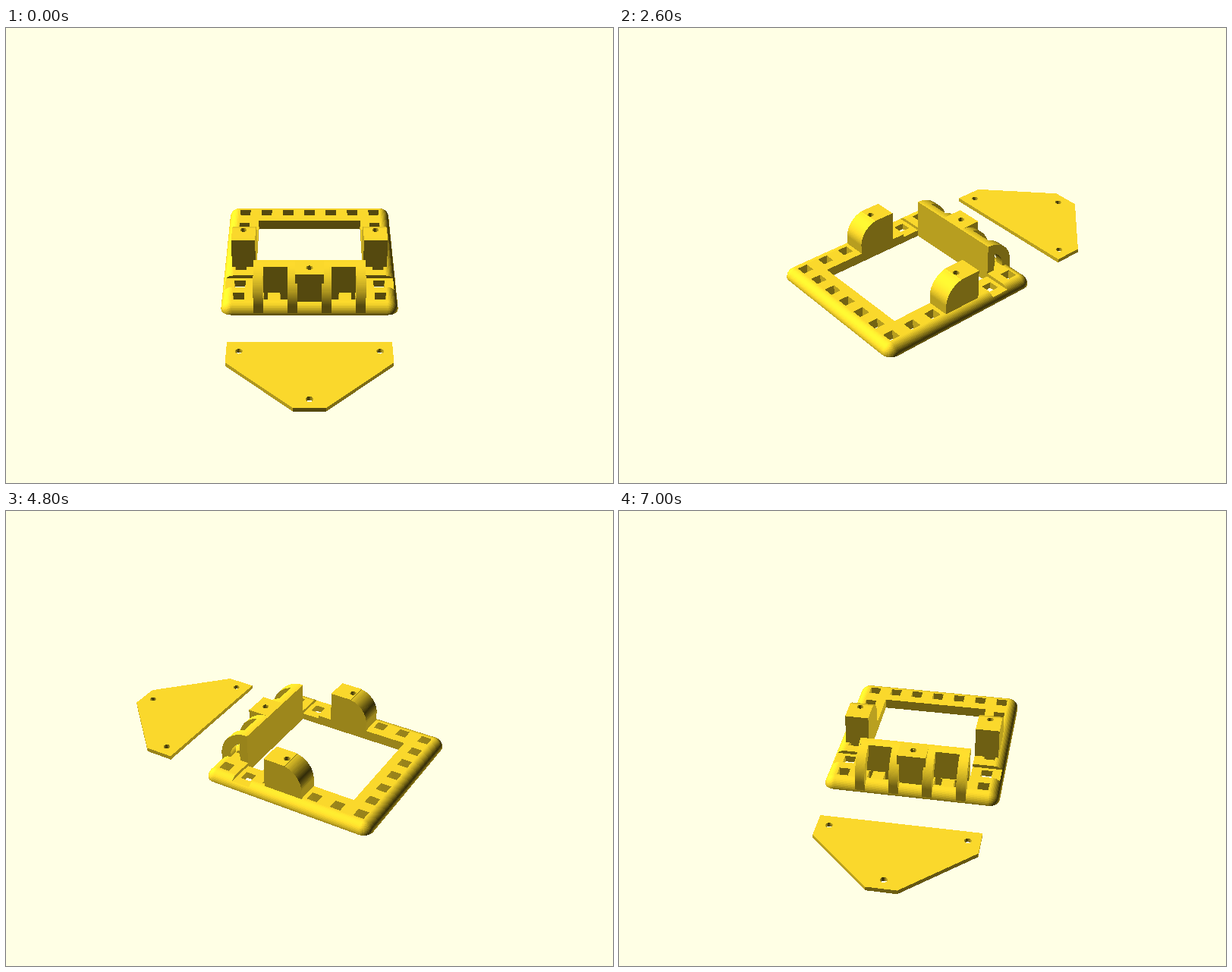
Recreate the animation shown at these times as an HTML page with a canvas. Size 800 by 600 pixels, loop 7.2 s.

```html
<!DOCTYPE html>
<html lang="en">
<head>
<meta charset="utf-8">
<title>Turntable</title>
<style>
  html, body { margin: 0; width: 100%; height: 100%; overflow: hidden; background: #ffffe5; }
  canvas { display: block; }
</style>
</head>
<body>
<canvas id="stage" width="800" height="600"></canvas>
<script>
const W = 800, H = 600, RAD = Math.PI / 180;
const FOCAL = 300 / Math.tan(11.25 * RAD), DIST = 500;
const SIN = Math.sin(55 * RAD), COS = Math.cos(55 * RAD);
const COLOR = [249, 215, 44], PAPER = 0xffe5ffff;
const STEP_MS = 200, STEPS = 36;

// ---- Model: a face is a list of planar loops, filled even-odd ----
const faces = [];
const alongX = (y, z, x) => [x, y, z];
const alongZ = (x, y, z) => [x, y, z];

function prism(loops, lo, hi, place, caps = true) {
  const sides = [];
  for (const loop of loops) {
    loop.forEach(([a, b], i) => {
      const [c, d] = loop[(i + 1) % loop.length];
      sides.push([[place(a, b, lo), place(c, d, lo), place(c, d, hi), place(a, b, hi)]]);
    });
  }
  faces.push(...sides);
  if (caps) for (const w of [lo, hi]) faces.push(loops.map(l => l.map(([a, b]) => place(a, b, w))));
  return sides;
}

function arc(cx, cy, r, from, to, n) {
  return Array.from({ length: n + 1 }, (_, i) => {
    const a = (from + (to - from) * i / n) * RAD;
    return [cx + r * Math.cos(a), cy + r * Math.sin(a)];
  });
}
const circle = (x, y, r) => arc(x, y, r, 0, 345, 23);
const rect = (x0, y0, x1, y1) => [[x0, y0], [x1, y0], [x1, y1], [x0, y1]];

const TOP = -4.6, BASE = -9.1, HIGH = 9.4, NOTCH_Z = -6.1;
const ROUND = TOP - BASE;
const INNER = 23.5, INNER_BACK = 34.7;
const OUTER = 32.9, FRONT = -26.1, BACK = 44.2; // where the rim starts to curve
const NOTCH_FRONT = -17, NOTCH_BACK = -8.6;

function buildFrame() {
  const holes = { front: [], left: [], right: [], back: [] };
  for (let i = 0; i < 7; i++) for (let j = 0; j < 7; j++) {
    if (i % 6 && j % 6) continue;
    const x = i * 10 - 30, y = j * 65 / 6 - 23.5;
    const part = j === 0 ? 'front' : j > 1 ? 'back' : i ? 'right' : 'left';
    holes[part].push(rect(x - 2.4, y - 2.4, x + 2.4, y + 2.4));
  }
  const horseshoe = [[-OUTER, NOTCH_BACK], [-INNER, NOTCH_BACK], [-INNER, INNER_BACK], [INNER, INNER_BACK],
    [INNER, NOTCH_BACK], [OUTER, NOTCH_BACK], [OUTER, BACK], [-OUTER, BACK]];
  prism([horseshoe, ...holes.back], BASE, TOP, alongZ);
  prism([rect(-OUTER, FRONT, OUTER, NOTCH_FRONT), ...holes.front], BASE, TOP, alongZ);
  prism([rect(-OUTER, NOTCH_FRONT, -INNER, NOTCH_BACK), ...holes.left], BASE, NOTCH_Z, alongZ);
  prism([rect(INNER, NOTCH_FRONT, OUTER, NOTCH_BACK), ...holes.right], BASE, NOTCH_Z, alongZ);
  buildRim();
}

// Quarter-round rim swept along the outline, lowered inside the notches
function buildRim() {
  const path = [];
  const corner = (x, y, from) => {
    for (let a = 0; a <= 90; a += 10) path.push([x, y, (from + a) * RAD]);
  };
  corner(OUTER, BACK, 0);
  corner(-OUTER, BACK, 90);
  path.push([-OUTER, NOTCH_BACK, Math.PI], [-OUTER, NOTCH_FRONT, Math.PI]);
  corner(-OUTER, FRONT, 180);
  corner(OUTER, FRONT, 270);
  path.push([OUTER, NOTCH_FRONT, 0], [OUTER, NOTCH_BACK, 0]);

  const point = ([x, y, a], deg, limit) => {
    const r = ROUND * Math.cos(deg * RAD);
    return [x + r * Math.cos(a), y + r * Math.sin(a), Math.min(limit, BASE + ROUND * Math.sin(deg * RAD))];
  };
  const atNotch = s => s[1] === NOTCH_BACK || s[1] === NOTCH_FRONT;
  path.forEach((s, i) => {
    const next = path[(i + 1) % path.length];
    const limit = atNotch(s) && atNotch(next) ? NOTCH_Z : TOP;
    const cap = [[s[0], s[1], BASE], point(s, 0, TOP)];
    for (let d = 0; d < 90; d += 6) {
      faces.push([[point(s, d, limit), point(next, d, limit), point(next, d + 6, limit), point(s, d + 6, limit)]]);
      cap.push(point(s, d + 6, TOP));
    }
    if (atNotch(s)) faces.push([cap]);
  });
}

function screwHole(topFace, x, y) {
  const ring = circle(x, y, 1.45);
  topFace.push(ring.map(([a, b]) => [a, b, HIGH]));
  prism([ring], HIGH - 10, HIGH, alongZ, false);
  faces.push([ring.map(([a, b]) => [a, b, HIGH - 10])]);
}

function buildPosts() {
  const profile = [[-2.3, TOP], [-2.3, HIGH], [7.6, HIGH], ...arc(5.8, HIGH - 9.8, 9.8, 78, 0, 26), [15.6, TOP]];
  for (const side of [-1, 1]) {
    const sides = prism([profile], side * INNER, side * 33.8, alongX);
    screwHole(sides[1], side * 28.8, 6);
  }
}

function buildHinge() {
  const r = 13.5, cy = NOTCH_FRONT, cz = HIGH - r, pocket = -21;
  const wall = [[cy, BASE], ...arc(cy, cz, r, 90, 107.2, 5), [pocket, BASE]];
  prism([wall], -INNER, INNER, alongX);
  const fin = [[cy, BASE], ...arc(cy, cz, r, 90, 180, 30), [cy - r, BASE]];
  const opening = [[pocket, TOP], ...arc(cy, cz, 9, 116.4, 180, 12), [cy - 9, TOP]];
  for (const x of [-INNER, -9.2, 5.1, 19.4]) prism([fin, opening], x, x + 4.1, alongX);
  const tab = [[cy, TOP], [cy, HIGH], [-27.1, HIGH], [-27.1, TOP]];
  screwHole(prism([tab], -6, 6, alongX)[1], 0, -22.3);
}

function buildPlate() {
  const outline = [[-33.4, -51], [33.4, -51], [33.4, -63.6], [6.2, -90], [-6.2, -90], [-33.4, -63.6]];
  const holes = [circle(-28.3, -56.7, 1.5), circle(28.3, -56.7, 1.5), circle(0, -85, 1.5)];
  prism([outline, ...holes], -8.9, -7.1, alongZ);
}

buildFrame();
buildPosts();
buildHinge();
buildPlate();

// ---- Renderer: flat shading with a depth buffer ----
const ctx = document.getElementById('stage').getContext('2d');
const image = ctx.createImageData(W, H);
const pixels = new Uint32Array(image.data.buffer);
const depth = new Float32Array(W * H);

// Newell normal of a loop
function normalOf(loop) {
  const n = [0, 0, 0];
  loop.forEach((p, i) => {
    const q = loop[(i + 1) % loop.length];
    for (let k = 0; k < 3; k++) {
      const u = (k + 1) % 3, v = (k + 2) % 3;
      n[k] += (p[u] - q[u]) * (p[v] + q[v]);
    }
  });
  const len = Math.hypot(...n);
  return len < 1e-7 ? null : n.map(c => c / len);
}

// Ambient plus two opposite lights; bright faces saturate per channel
function shade(n) {
  const light = 0.2 + Math.abs(n[2] - n[0] - n[1]) / Math.sqrt(3);
  const [r, g, b] = COLOR.map(c => Math.min(255, Math.round(c * light)));
  return (255 << 24 | b << 16 | g << 8 | r) >>> 0;
}

function fillFace(loops) {
  const n = normalOf(loops[0]);
  if (!n) return;
  const p = loops[0][0], k = n[0] * p[0] + n[1] * p[1] + n[2] * p[2];
  if (Math.abs(k) < 1e-4) return;
  const color = shade(n);
  const flat = loops.map(l => l.map(([x, d, v]) => [W / 2 + FOCAL * x / d, H / 2 - FOCAL * v / d]));
  const ys = flat[0].map(q => q[1]);
  const y0 = Math.max(0, Math.ceil(Math.min(...ys) - 0.5));
  const y1 = Math.min(H - 1, Math.floor(Math.max(...ys) - 0.5));
  for (let y = y0; y <= y1; y++) {
    const line = y + 0.5, cuts = [];
    for (const loop of flat) {
      loop.forEach((a, i) => {
        const b = loop[(i + 1) % loop.length];
        if (a[1] <= line !== b[1] <= line) cuts.push(a[0] + (line - a[1]) / (b[1] - a[1]) * (b[0] - a[0]));
      });
    }
    cuts.sort((a, b) => a - b);
    const row = (n[1] + n[2] * (H / 2 - line) / FOCAL) / k, slope = n[0] / FOCAL / k;
    for (let i = 0; i + 1 < cuts.length; i += 2) {
      const end = Math.min(W, Math.ceil(cuts[i + 1] - 0.5));
      for (let x = Math.max(0, Math.ceil(cuts[i] - 0.5)); x < end; x++) {
        const near = row + slope * (x + 0.5 - W / 2), at = y * W + x;
        if (near > depth[at]) {
          depth[at] = near;
          pixels[at] = color;
        }
      }
    }
  }
}

function render(angle) {
  const s = Math.sin(angle), c = Math.cos(angle);
  // Camera space: right, away, up
  const toCamera = ([x, y, z]) => {
    const far = x * s + y * c;
    return [x * c - y * s, DIST + far * SIN - z * COS, far * COS + z * SIN];
  };
  pixels.fill(PAPER);
  depth.fill(0);
  for (const face of faces) fillFace(face.map(loop => loop.map(toCamera)));
  ctx.putImageData(image, 0, 0);
}

const start = performance.now();
let shown = -1;
function tick() {
  const step = Math.floor((performance.now() - start) / STEP_MS) % STEPS;
  if (step !== shown) {
    shown = step;
    render(step * 2 * Math.PI / STEPS);
  }
  requestAnimationFrame(tick);
}
tick();
</script>
</body>
</html>
```
